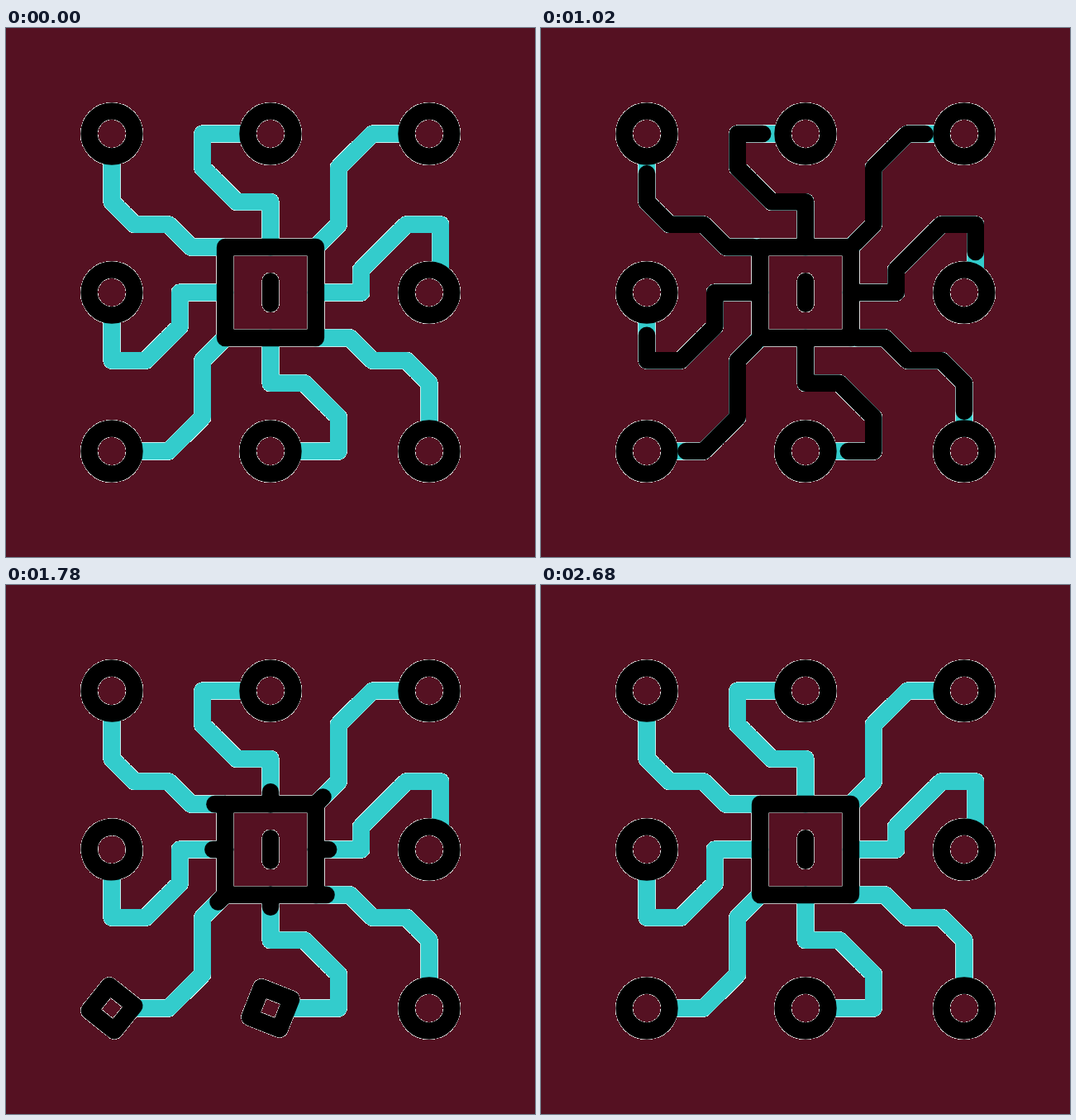
Recreate the animation shown at these times as an HTML page with a canvas. Size 640 px wide and 640 px high, loop 3.02 s.

```html
<!DOCTYPE html>
<html lang="en">
<head>
<meta charset="utf-8">
<title>Circuit</title>
<style>
  html, body { margin: 0; width: 100%; height: 100%; overflow: hidden; background: #551122; }
  canvas { display: block; width: 640px; height: 640px; }
</style>
</head>
<body>
<canvas id="stage" width="640" height="640"></canvas>
<script>
const SIZE = 640, LOOP = 3020, STEP = 20;
const UNIT = 192 / 7;        // grid cell in pixels
const STROKE = 0.75;         // line width in cells
const CYAN = '#33cccc', BLACK = '#000';
const ctx = document.getElementById('stage').getContext('2d', { willReadFrequently: true });

// A trace runs from node to chip, in cells from the centre, repeated at quarter turns.
function makeTraces(d, ...turns) {
  const svgPath = document.createElementNS('http://www.w3.org/2000/svg', 'path');
  svgPath.setAttribute('d', d);
  const path = new Path2D(d), length = svgPath.getTotalLength();
  return turns.map(turn => ({ path, length, angle: turn * Math.PI / 2 }));
}

const traces = [
  ...makeTraces('M-7 -6 v2 l1 1 h1.5 l1 1 h1.5', 0, 2),
  ...makeTraces('M-1 -7 h-2 v1.5 l1.5 1.5 h1.5 v2', 0, 2, -1),
  ...makeTraces('M6 -7 h-1.5 l-1.5 1.5 v2.5 l-1 1', 0, 2),
  ...makeTraces('M7.5 -.87 V-3 h-1.5 l-2 2 v1 h-2', 0)
];

const clamp = v => Math.min(1, Math.max(0, v));
const smooth = s => s * s * (3 - 2 * s);
const ramp = (time, start, duration) => smooth(clamp((time - start) / duration));

// Cubic easing with horizontal handles at x1 and x2.
function ease(time, start, duration, x1, x2) {
  const x = clamp((time - start) / duration);
  if (x === 0 || x === 1) return x;
  let low = 0, high = 1;
  for (let i = 0; i < 24; i++) {
    const s = (low + high) / 2, r = 1 - s;
    if (3 * r * r * s * x1 + 3 * r * s * s * x2 + s * s * s < x) low = s;
    else high = s;
  }
  return smooth(low);
}

function drawTrace({ path, length, angle }, from, to) {
  if (to - from < 1e-5) return;
  ctx.save();
  ctx.rotate(angle);
  ctx.setLineDash([length * (to - from), length * 2]);
  ctx.lineDashOffset = -length * from;
  ctx.stroke(path);
  ctx.restore();
}

// A circle whose handles shrink until it is an inscribed square.
function drawNode(x, y, time) {
  const square = ramp(time, 0, 120) - ramp(time, 245, 125);
  const handle = 0.5523 * (1 - square);
  ctx.save();
  ctx.translate(x, y);
  ctx.rotate(Math.PI * (ease(time, 0, 545, 0.5, 0.1) + 0.25));
  ctx.beginPath();
  ctx.moveTo(1, 0);
  let px = 1, py = 0;
  for (let i = 0; i < 4; i++) {
    const qx = -py, qy = px;
    ctx.bezierCurveTo(px + qx * handle, py + qy * handle,
                      qx + px * handle, qy + py * handle, qx, qy);
    px = qx;
    py = qy;
  }
  ctx.closePath();
  ctx.stroke();
  ctx.restore();
}

// Nodes spin one after another, counter-clockwise from the top left.
function drawNodes(time) {
  for (let i = 0; i < 8; i++) {
    const angle = -(i + 3) * Math.PI / 4;
    drawNode(7 * Math.round(Math.cos(angle)), 7 * Math.round(Math.sin(angle)),
             time - 1306 - 118 * i);
  }
}

function drawChip() {
  ctx.strokeRect(-2, -2, 4, 4);
  ctx.beginPath();
  ctx.moveTo(0, -0.5);
  ctx.lineTo(0, 0.5);
  ctx.stroke();
}

// Partly covered edge pixels blend with white, which leaves a pale rim.
function matteEdges() {
  const image = ctx.getImageData(0, 0, SIZE, SIZE), px = image.data;
  for (let i = 0; i < px.length; i += 4) {
    const alpha = px[i + 3];
    if (alpha === 0 || alpha === 255) continue;
    for (let c = i; c < i + 3; c++) px[c] = px[c] * alpha / 255 + 255 - alpha;
    px[i + 3] = 255;
  }
  ctx.putImageData(image, 0, 0);
}

function draw(time) {
  ctx.setTransform(1, 0, 0, 1, 0, 0);
  ctx.clearRect(0, 0, SIZE, SIZE);
  ctx.setTransform(UNIT, 0, 0, UNIT, SIZE / 2, SIZE / 2);
  ctx.lineWidth = STROKE;
  ctx.lineCap = ctx.lineJoin = 'round';

  ctx.strokeStyle = CYAN;
  traces.forEach(trace => drawTrace(trace, 0, 1));

  ctx.strokeStyle = BLACK;
  const head = ease(time, 345, 970, 1 / 3, 0);
  const tail = ease(time, 820, 1505, 1 / 3, 0);
  traces.forEach(trace => drawTrace(trace, tail, head));
  drawNodes(time);
  drawChip();
  matteEdges();
}

const origin = performance.now();
function tick() {
  const time = (performance.now() - origin) % LOOP;
  draw(Math.floor(time / STEP) * STEP);
  requestAnimationFrame(tick);
}
tick();
</script>
</body>
</html>
```
